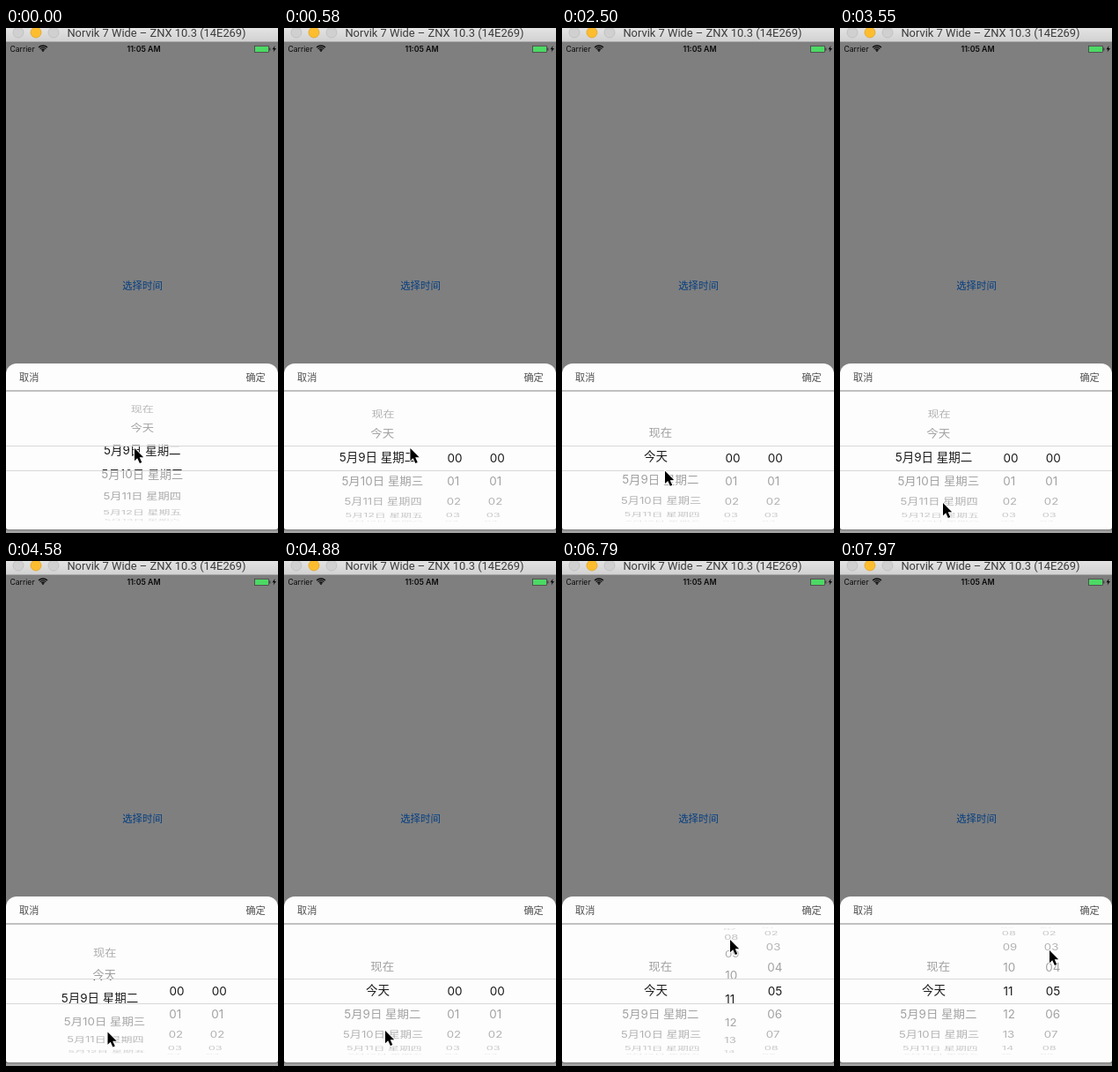
Animation, 309 px wide and 572 px high, one loop 8 s. Source, as an HTML page with a canvas:

```html
<!DOCTYPE html>
<html lang="zh">
<head>
<meta charset="utf-8">
<title>Date picker</title>
<style>
html, body { margin: 0; width: 100%; height: 100%; overflow: hidden; }
canvas { display: block; width: 309px; height: 572px; }
</style>
</head>
<body>
<canvas id="stage"></canvas>
<script>
const W = 309, H = 572, LOOP = 8000, STEP = 147.6, LAST_STEP = 54;
const canvas = document.getElementById('stage');
const ctx = canvas.getContext('2d');
const ratio = window.devicePixelRatio || 1;
canvas.width = W * ratio;
canvas.height = H * ratio;

const SANS = 'Inter, "Noto Sans CJK SC", "Noto Sans CJK", sans-serif';
const CENTER_Y = 487, RADIUS = 71.3, ROW_ANGLE = 22 * Math.PI / 180;
const LENS_TOP = 473.5, LENS_BOTTOM = 501.5;
const INK = '#0a0a0a';

// Progress from 0 to 1 between two steps
const ramp = (step, from, to) => Math.min(1, Math.max(0, (step - from) / (to - from)));

function motion(step) {
  const r = (from, to) => ramp(step, from, to);
  return {
    split: step >= 4,
    day: 2 + 0.29 * (1 - r(0, 3)) - 0.95 * (r(13, 17) - r(20, 23)) - r(30, 33),
    hour: 11 * r(33, 40) ** 2 - 0.36 * (r(44, 46) - r(46, 49)),
    minute: step < 38 ? 45 * r(33, 37) : 5,
    cursorX: 146 - 29 * r(0, 9) ** 3 - 2 * r(25, 33) + 76 * r(37, 44) + 47 * r(46, 54),
    cursorY: 476 + 62 * r(12, 24) - 6 * r(25, 33) - 103 * r(37, 46) + 12 * r(46, 54)
  };
}

function text(str, x, y, size, color, align = 'left', weight = 400, family = SANS) {
  ctx.font = `${weight} ${size}px ${family}`;
  ctx.fillStyle = color;
  ctx.textAlign = align;
  ctx.fillText(str, x, y);
}

function rect(x, y, w, h, color) {
  ctx.fillStyle = color;
  ctx.fillRect(x, y, w, h);
}

function polygon(points) {
  ctx.beginPath();
  points.forEach(([x, y]) => ctx.lineTo(x, y));
  ctx.closePath();
}

function dayLabel(i) {
  if (i < 2) return ['现在', '今天'][i];
  return `5月${i + 7}日 星期${'日一二三四五六'[i % 7]}`;
}

const twoDigits = i => String(i).padStart(2, '0');

function windowFrame() {
  rect(0, 0, W, H, '#7f7f7f');
  const bar = ctx.createLinearGradient(0, 0, 0, 15);
  bar.addColorStop(0, '#e3e3e3');
  bar.addColorStop(1, '#d2d2d2');
  rect(0, 0, W, 15, bar);
  rect(0, 15, W, 1, '#aaaaaa');
  ['#d0d0d0', '#fdbd2e', '#d0d0d0'].forEach((color, i) => {
    ctx.beginPath();
    ctx.arc(14 + 20 * i, 5, 6, 0, Math.PI * 2);
    ctx.fillStyle = color;
    ctx.fill();
    ctx.strokeStyle = i === 1 ? '#dfa023' : '#b9b9b9';
    ctx.lineWidth = 0.7;
    ctx.stroke();
  });
  text('Norvik 7 Wide – ZNX 10.3 (14E269)', 171, 10, 12.9, '#3c3c3c', 'center', 400, 'Roboto, sans-serif');
}

function statusBar() {
  text('Carrier', 4.5, 27, 8.6, INK);
  text('11:05 AM', 156.5, 27, 8.8, INK, 'center', 600);
  ctx.strokeStyle = INK;
  ctx.lineWidth = 1.3;
  for (let radius = 2.6; radius < 8; radius += 2.2) {
    ctx.beginPath();
    ctx.arc(42, 27, radius, -Math.PI * 0.75, -Math.PI * 0.25);
    ctx.stroke();
  }
  rect(41.2, 25.2, 1.6, 1.6, INK);
  ctx.lineWidth = 0.6;
  ctx.strokeStyle = '#333333';
  ctx.strokeRect(282.3, 20.2, 16.4, 7.4);
  rect(283, 21, 15, 6, '#4cd964');
  rect(299.3, 22.5, 1, 3, '#333333');
  polygon([[305.5, 20], [302.5, 24.3], [304.5, 24.3], [303.6, 27.6], [307, 23], [305, 23]]);
  ctx.fillStyle = INK;
  ctx.fill();
}

function sheet() {
  ctx.beginPath();
  ctx.roundRect(0, 380, W, 188, [12, 12, 3, 3]);
  ctx.fillStyle = '#fdfdfd';
  ctx.fill();
  text('取消', 15, 399.7, 11.2, '#505050');
  text('确定', 294.8, 399.7, 11.2, '#505050', 'right');
  rect(0, 410.5, W, 1, '#858585');
  rect(0, 568, W, 1, '#777777');
  rect(0, 569, W, 3, '#a0a0a0');
}

// One column on a cylinder, narrowing slightly toward the stage centre
function wheel(pos, count, label, x, align, baseline, color, fade) {
  const first = Math.max(0, Math.ceil(pos - 4));
  const last = Math.min(count - 1, Math.floor(pos + 4));
  for (let i = first; i <= last; i++) {
    const angle = (i - pos) * ROW_ANGLE;
    if (Math.abs(angle) > Math.PI / 2) continue;
    const depth = Math.cos(angle);
    const scale = 1 - 0.087 * (1 - depth);
    ctx.save();
    ctx.globalAlpha = fade ? Math.min(1, 0.25 + 0.8 * depth) : 1;
    ctx.translate(W / 2 + (x - W / 2) * scale, CENTER_Y + RADIUS * Math.sin(angle));
    ctx.scale(scale, Math.max(0.1, depth));
    text(label(i), 0, baseline, 13.5, color, align);
    ctx.restore();
  }
}

function wheels(state, color, lens) {
  const dayX = state.split ? (lens ? 106.5 : 111.5) : 154.8;
  wheel(state.day, 60, dayLabel, dayX, 'center', 4.3, color, !lens);
  if (!state.split) return;
  wheel(state.hour, 24, twoDigits, 185.4, 'left', 4.7, color, !lens);
  wheel(state.minute, 60, twoDigits, 233.8, 'left', 4.7, color, !lens);
}

function clipped(bands, draw) {
  ctx.save();
  ctx.beginPath();
  bands.forEach(([top, bottom]) => ctx.rect(0, top, W, bottom - top));
  ctx.clip();
  draw();
  ctx.restore();
}

function picker(state) {
  clipped([[412, LENS_TOP], [LENS_BOTTOM, 568]], () => wheels(state, '#a0a0a0', false));
  clipped([[LENS_TOP, LENS_BOTTOM]], () => wheels(state, '#1c1c1c', true));
  [LENS_TOP, LENS_BOTTOM].forEach(y => rect(0, y - 0.5, W, 1, '#d8d8d8'));
}

function cursor(x, y) {
  ctx.save();
  ctx.translate(x, y);
  polygon([[0, 0], [0, 14.2], [3.2, 11.2], [5.9, 17], [8.3, 15.9], [5.7, 10.3], [10.2, 10.2]]);
  ctx.lineJoin = 'round';
  ctx.lineWidth = 1.6;
  ctx.strokeStyle = '#ffffff';
  ctx.stroke();
  ctx.fillStyle = '#000000';
  ctx.fill();
  ctx.restore();
}

function render(time) {
  const step = Math.min(LAST_STEP, Math.floor((time % LOOP + 15) / STEP));
  const state = motion(step);
  ctx.setTransform(ratio, 0, 0, ratio, 0, 0);
  windowFrame();
  statusBar();
  text('选择时间', 155, 296, 11.4, '#063f80', 'center');
  sheet();
  picker(state);
  cursor(state.cursorX, state.cursorY);
}

const start = performance.now();
function loop() {
  render(performance.now() - start);
  requestAnimationFrame(loop);
}
loop();
</script>
</body>
</html>
```
